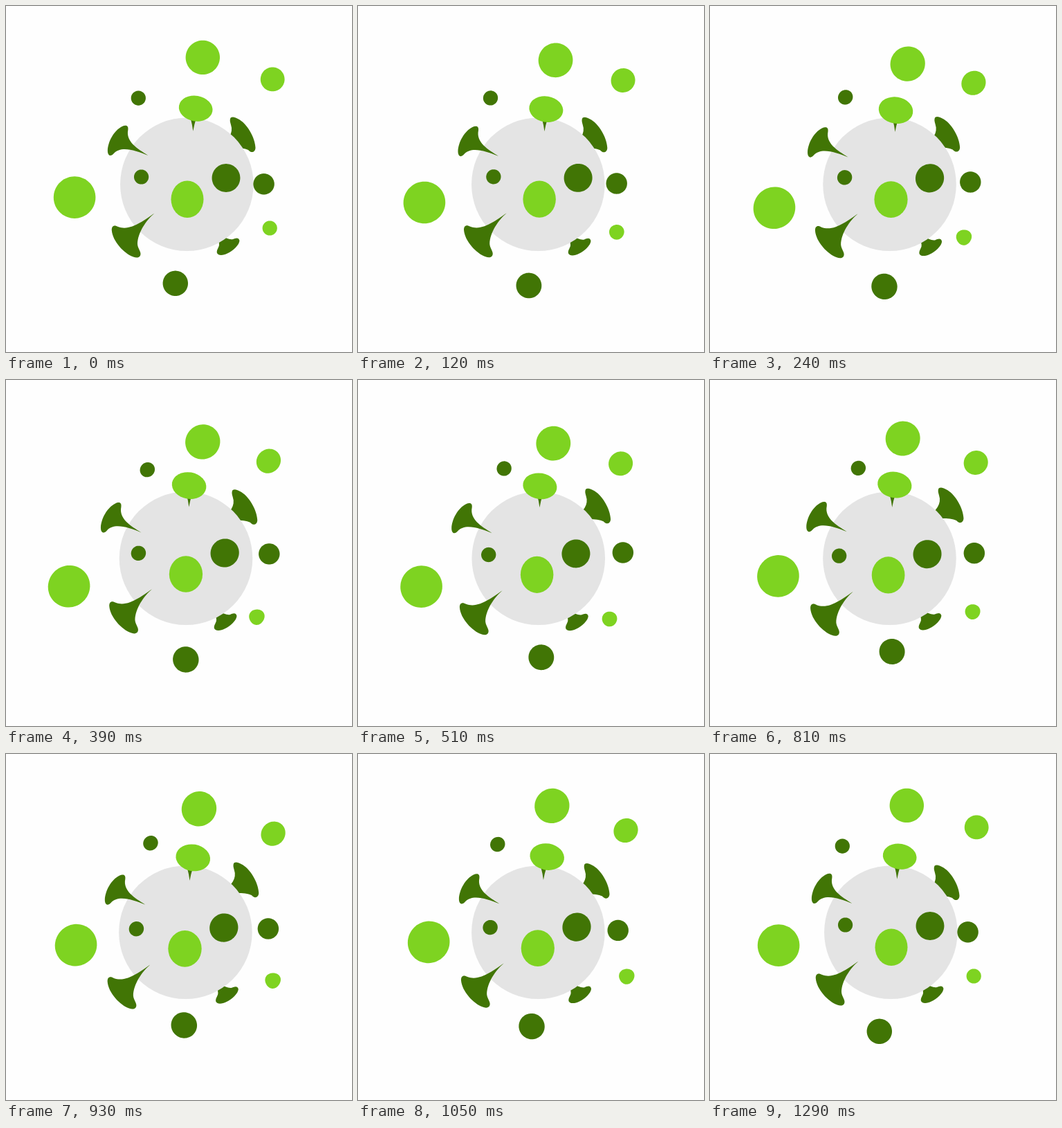
Recreate the animation shown at these times as an HTML page with a canvas. Size 500x500 px, loop 1.35 s.

```html
<!DOCTYPE html>
<html lang="en">
<head>
<meta charset="utf-8">
<title>Floating cell</title>
<style>
  html, body { margin: 0; width: 100%; height: 100%; overflow: hidden; background: #fefefe; }
  canvas { display: block; width: 500px; height: 500px; }
</style>
</head>
<body>
<canvas id="stage" width="500" height="500"></canvas>
<script>
const ctx = document.getElementById('stage').getContext('2d');
const LIGHT = '#7ed321', DARK = '#417505', GREY = '#e4e4e4';
const LOOP = 1350, CYCLE = 1290, STEP = 30;
const { sin, cos, PI } = Math;

// All motion is a function of the phase p, which runs from 0 to 2 PI.

// Elliptical path around (x, y) with cosine arm (cx, cy) and sine arm (sx, sy).
const orbit = (x, y, cx, cy, sx, sy) => p => [
  x + cx * cos(p) + sx * sin(p),
  y + cy * cos(p) + sy * sin(p)
];

// To and fro from (x, y) by (dx, dy), lagging behind the phase.
const swing = (lag, x, y, dx, dy) => p => {
  const k = .5 - .54 * cos(p - lag);
  return [x + dx * k, y + dy * k];
};
const EARLY = -.44, EVEN = -.06, LATE = .4;

const ballPath = p => [260.3 + .35 * cos(p) + .9 * cos(2 * p + .7), 257.7];

// Shapes are round at both ends of the swing and soft in between.
const softness = p => sin(p) ** 2;

function blob(color, path, r, { grow = .01, skew = .015, tri = 0 } = {}) {
  return p => {
    const [x, y] = path(p), w = softness(p);
    ctx.beginPath();
    for (let i = 0; i < 72; i++) {
      const a = i * PI / 36;
      const d = r * (1 + w * (grow - skew * sin(2 * a) - tri * sin(3 * a)));
      ctx.lineTo(x + d * cos(a), y + d * sin(a));
    }
    ctx.fillStyle = color;
    ctx.fill();
  };
}

function oval(color, path, rx, ry, { tilt = 0, growX = 0, growY = 0 } = {}) {
  return p => {
    const [x, y] = path(p), w = softness(p);
    ctx.beginPath();
    ctx.ellipse(x, y, rx * (1 + growX * w), ry * (1 + growY * w), tilt, 0, 2 * PI);
    ctx.fillStyle = color;
    ctx.fill();
  };
}

function spike(path, d) {
  const shape = new Path2D(d);
  return p => {
    ctx.save();
    ctx.translate(...path(p));
    ctx.fillStyle = DARK;
    ctx.fill(shape);
    ctx.restore();
  };
}

const parts = [
  // behind the ball
  spike(swing(LATE, 0, 0, 6, -5),
    'M300 205C318 198 327 188 326 176C325 170 323 167 324 163C325 159.5 330 160 335 163' +
    'C348 169 360 190 360.5 205C360 212 354 213 350 208C340 203 320 206 300 205Z'),
  spike(swing(EARLY, 0, 0, -4.6, 2.3),
    'M290 318C304 330 309 340 308 346C307 350 304 353 305 357C307 361.5 315 360 320 357.5' +
    'C328 354 337.5 345 337.5 339C336.5 334 332 335 328 337C320 339 305 328 290 318Z'),
  oval(GREY, ballPath, 96.3, 96.3),

  // on the ball
  spike(swing(EARLY, 0, 0, -11.5, 5),
    'M205.5 216C190 206 173 196 176.5 179C177.5 172.5 173 171.5 168 174' +
    'C156 180 147.5 196 147 209C147 217 152 218 156 213C166 202 186 208 205.5 216Z'),
  spike(swing(LATE, 0, 0, -7.7, 6.2),
    'M214.5 299.5C203 309 190 328 190 344C190.5 350 194.5 354 194.5 358' +
    'C194.5 364 189 364.5 184 362.5C171 358 154 340 152.8 324' +
    'C152.5 317 157 316 162 319C180 326 200 309 214.5 299.5Z'),
  spike(swing(EVEN, 270, 181, -8, 3.4), 'M0 0Q-1 -9 -4 -20L5 -20Q1.5 -9 0 0Z'),
  oval(LIGHT, swing(EARLY, 274.3, 148, -11.1, 5.2), 24.5, 18.4,
    { tilt: .17, growX: .02, growY: .05 }),
  oval(LIGHT, swing(LATE, 262, 279.3, -4.4, 2.6), 23.5, 26.8, { growX: .03, growY: -.02 }),
  blob(DARK, swing(LATE, 318, 248.5, -4, 3.2), 20.4),
  blob(DARK, swing(LATE, 195.6, 247, -9, 7.2), 10.6),

  // floating around
  blob(LIGHT, orbit(282.2, 82.4, 2.1, -8, 2.9, 4.7), 24.7, { grow: .02 }),
  blob(LIGHT, orbit(383.2, 114.1, 2, -8.2, -3.3, .4), 17.4, { skew: .04 }),
  blob(LIGHT, orbit(96.6, 285.2, 2.5, -8.6, -5, 10.8), 30.3, { grow: 0 }),
  blob(LIGHT, orbit(375.3, 332.2, 5.9, -11.2, -11.6, 7), 10.6, { grow: .06, tri: .035 }),
  blob(DARK, orbit(203.5, 130, -12.2, 3.1, -3.3, .7), 10.6, { skew: .03 }),
  blob(DARK, orbit(255.8, 398.6, -11, 2.2, .5, 6.4), 18.2, { grow: .03, skew: -.01 }),
  blob(DARK, swing(EVEN, 373, 257, 10.4, -8), 15.2, { grow: 0, skew: 0 })
];

function draw(now) {
  const t = Math.min(Math.floor(now % LOOP / STEP) * STEP, CYCLE);
  ctx.fillStyle = '#fefefe';
  ctx.fillRect(0, 0, 500, 500);
  parts.forEach(part => part(2 * PI * t / CYCLE));
}

const start = performance.now();
function tick() {
  draw(performance.now() - start);
  requestAnimationFrame(tick);
}
tick();
</script>
</body>
</html>
```
